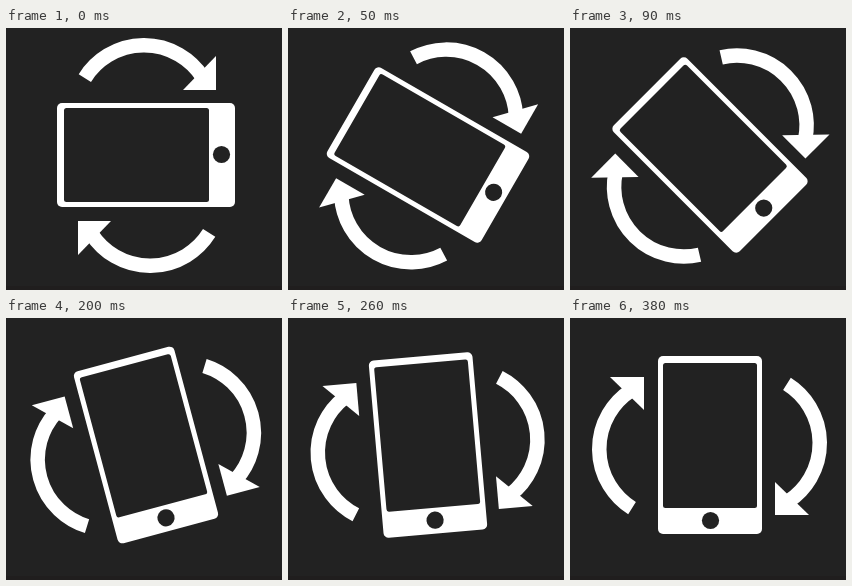
Write an HTML page that moves like this. It is 276x262 px and loops after 1.38 s.

```html
<!DOCTYPE html>
<html lang="en">
<head>
<meta charset="utf-8">
<title>Rotate your phone</title>
<style>
  html, body { margin: 0; width: 100%; height: 100%; overflow: hidden; background: #222; }
  svg { display: block; width: 100vw; height: 100vh; }
</style>
</head>
<body>
<svg viewBox="0 0 276 262" fill="#fff">
  <rect width="276" height="262" fill="#222"/>
  <rect y="258" width="276" height="4" fill="#201e1e"/>
  <g id="device">
    <rect x="51" y="75" width="178" height="104" rx="5"/>
    <rect x="58" y="80" width="145" height="94" rx="2.5" fill="#222"/>
    <circle cx="215.5" cy="126.5" r="8.6" fill="#222"/>
    <g id="arrow">
      <path id="arc" fill="none" stroke="#fff" stroke-width="14.5"/>
      <path d="M177 62H210V28Z"/>
    </g>
    <use href="#arrow" transform="rotate(180 141 127.5)"/>
  </g>
</svg>
<script>
const LOOP = 1380;
// [start in ms, angle in degrees]: even steps, then settling
const steps = [[0, 0], [20, 15], [50, 30], [90, 45], [140, 60], [200, 75], [260, 85], [320, 88.5], [380, 90]];
const device = document.getElementById('device');

function arcPoint(deg) {
  const a = deg * Math.PI / 180;
  return `${138 + 69.75 * Math.cos(a)} ${87 + 69.75 * Math.sin(a)}`;
}
document.getElementById('arc').setAttribute('d',
  `M${arcPoint(-148)}A69.75 69.75 0 0 1 ${arcPoint(-33)}`);

function draw(now) {
  const t = now % LOOP;
  const angle = steps.filter(([start]) => start <= t).pop()[1];
  device.setAttribute('transform', `rotate(${angle} 140 127)`);
}

function tick() {
  draw(performance.now());
  requestAnimationFrame(tick);
}
tick();
</script>
</body>
</html>
```
